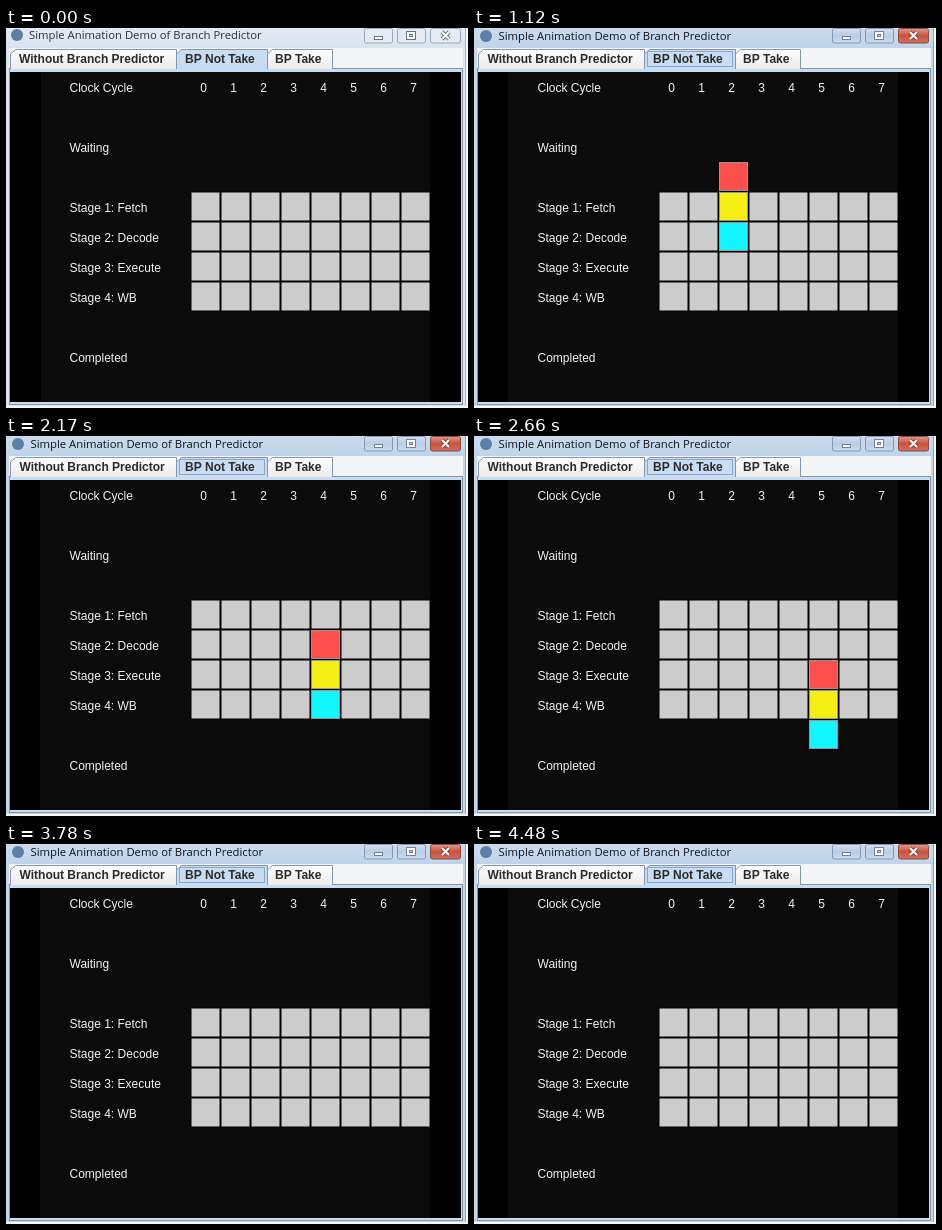
These frames come from a looping animation (462 px wide and 380 px high, 4.55 s). An HTML page with a canvas:

```html
<!DOCTYPE html>
<html lang="en">
<head>
<meta charset="utf-8">
<title>Branch predictor demo</title>
<style>
  html, body { margin: 0; width: 100%; height: 100%; overflow: hidden; background: #fff; }
  canvas { display: block; }
</style>
</head>
<body>
<canvas id="stage" width="462" height="380"></canvas>
<script>
const ctx = document.getElementById('stage').getContext('2d');
const LOOP = 4550, PITCH = 30, CYCLE = 490;
const GRID = { x: 185.5, y: 164.5, cols: 8, rows: 4 };
const BLOCKS = ['#14f6ff', '#f4ee14', '#ff504c'];
const LABELS = [
  ['Clock Cycle', 60], ['Waiting', 120], ['Stage 1: Fetch', 180], ['Stage 2: Decode', 210],
  ['Stage 3: Execute', 240], ['Stage 4: WB', 270], ['Completed', 330]
];
const SANS = '"Liberation Sans", Arial, sans-serif';

function box(x, y, w, h, fill, stroke) {
  ctx.fillStyle = fill;
  ctx.fillRect(x, y, w, h);
  if (stroke) {
    ctx.strokeStyle = stroke;
    ctx.strokeRect(x + .5, y + .5, w - 1, h - 1);
  }
}

function text(str, x, y, font, color, align = 'left') {
  ctx.font = font;
  ctx.fillStyle = color;
  ctx.textAlign = align;
  ctx.fillText(str, x, y);
}

function gradient(y0, y1, ...colors) {
  const g = ctx.createLinearGradient(0, y0, 0, y1);
  colors.forEach((c, i) => g.addColorStop(i / (colors.length - 1), c));
  return g;
}

function roundButton(x, w, fill, stroke) {
  ctx.beginPath();
  ctx.roundRect(x + .5, .5, w - 1, 14.5, 2);
  ctx.fillStyle = fill;
  ctx.fill();
  ctx.strokeStyle = stroke;
  ctx.stroke();
}

function cross(color, width) {
  ctx.strokeStyle = color;
  ctx.lineWidth = width;
  ctx.beginPath();
  ctx.moveTo(436, 4); ctx.lineTo(443, 11);
  ctx.moveTo(443, 4); ctx.lineTo(436, 11);
  ctx.stroke();
  ctx.lineWidth = 1;
}

function drawFrame(active) {
  box(0, 0, 462, 380, active ? '#c3d7ec' : '#dce6f2');
  box(0, 0, 462, 20, active ? gradient(0, 20, '#cbdbec', '#bfd4eb') : gradient(0, 20, '#e3eaf4', '#d9e4f1'));
  box(459, 0, 1, 380, active ? '#8fa3b8' : '#a8b4c0');
  box(460, 0, 2, 380, '#f8f9fa');
  box(0, 378, 462, 2, '#f4f6f8');

  ctx.fillStyle = '#5b7fa5';
  ctx.beginPath();
  ctx.arc(active ? 12 : 11, active ? 8 : 7, 6, 0, 7);
  ctx.fill();
  text('Simple Animation Demo of Branch Predictor', active ? 24.5 : 23, active ? 12 : 11,
    '11.3px "Open Sans", "Noto Sans", sans-serif', active ? '#10141a' : '#2c333c');

  const face = active ? gradient(0, 15, '#d6e3f1', '#b9cde3', '#c8dbef') : '#e4ebf4';
  const edge = active ? '#8599b2' : '#99a6b7';
  const ink = active ? '#71839a' : '#667282';
  roundButton(358, 29, face, edge);
  roundButton(391, 29, face, edge);
  roundButton(424, 31, active ? gradient(0, 15, '#e0a093', '#c9523f', '#d3705e') : face, active ? '#8a4a45' : edge);
  box(368, 8, 9, 4, '#fff', ink);
  box(400, 3, 10, 9, '#fff', ink);
  box(403, 6, 4, 3, face, ink);
  cross(active ? '#8a443b' : ink, 4);
  cross('#fff', 2);
}

function drawTab(label, x, w, textX, selected, active) {
  const top = 21;
  ctx.beginPath();
  ctx.moveTo(x + .5, 41);
  ctx.lineTo(x + .5, top + 5);
  ctx.lineTo(x + 5.5, top + .5);
  ctx.lineTo(x + w + .5, top + .5);
  ctx.lineTo(x + w + .5, 41);
  ctx.fillStyle = selected ? '#c8ddf2' : gradient(22, 41, '#fdfdfd', '#ececec');
  ctx.fill();
  ctx.strokeStyle = '#8796a4';
  ctx.stroke();
  if (selected && active) {
    ctx.strokeStyle = '#8ba4d0';
    ctx.strokeRect(x + 3.5, 23.5, w - 6, 15);
  }
  text(label, textX, 35, `bold 12px ${SANS}`, '#2b2b2b');
}

function drawPanel(active) {
  box(3, 20, 454, 21, '#f4f5f7');
  box(3, 40, 454, 337, '#c8ddf2', '#8796a4');
  drawTab('Without Branch Predictor', 4, 166, active ? 13.5 : 13, false, active);
  drawTab('BP Take', 261, 65, 269, false, active);
  drawTab('BP Not Take', 170, 91, 179, true, active);
  box(171, 40, 90, 2, '#c8ddf2');

  const left = active ? 34 : 35;
  box(4, 44, 451, 330, '#000');
  box(left, 44, 424 - left, 330, '#0b0b0b');
  for (const [label, y] of LABELS) text(label, 63.5, y + 4, `12px ${SANS}`, '#f2f2f2');

  box(GRID.x - 1, GRID.y - 1, 239, 120, '#000');
  for (let c = 0; c < GRID.cols; c++) {
    text(c, GRID.x + 12 + c * PITCH, 64, `12px ${SANS}`, '#f2f2f2', 'center');
    for (let r = 0; r < GRID.rows; r++)
      box(GRID.x + c * PITCH, GRID.y + r * PITCH, 28, 28, '#ccc');
  }
}

// Each clock cycle the stack moves one column right and one stage down.
function drawBlocks(t) {
  if (t < 70 || t >= 3360) return;
  const cycle = Math.floor(t / CYCLE);
  BLOCKS.forEach((color, i) =>
    box(GRID.x - .5 + cycle * PITCH, GRID.y - .5 + (cycle - 1 - i) * PITCH, 29, 29, color, '#969696'));
}

function draw(now) {
  const t = now % LOOP;
  const active = t >= 140 && t < 4130 || t >= 4340;
  drawFrame(active);
  drawPanel(active);
  drawBlocks(t);
  requestAnimationFrame(draw);
}
requestAnimationFrame(draw);
</script>
</body>
</html>
```
